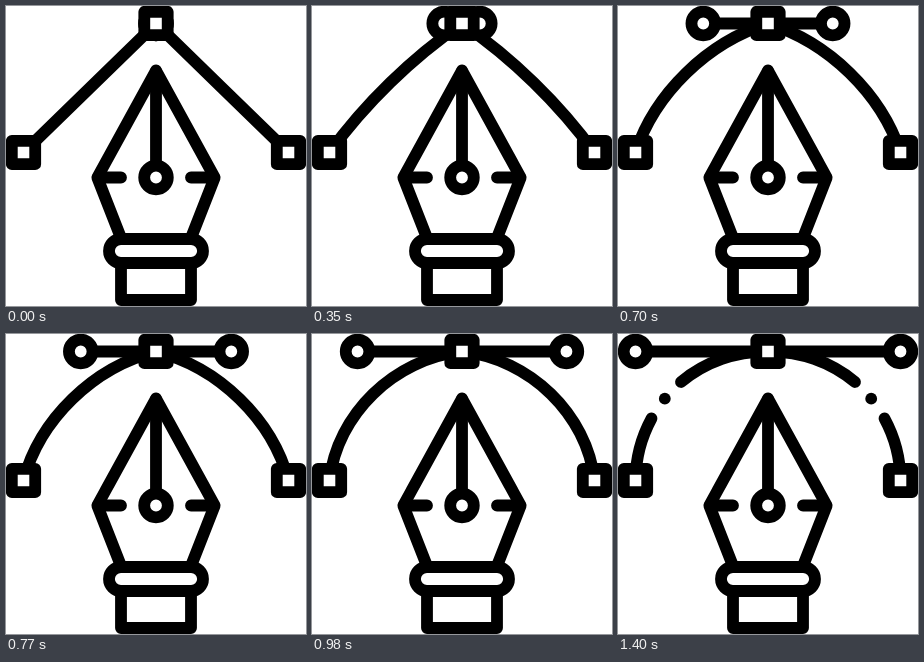
Recreate the animation shown at these times as an HTML page. Size 300 px wide and 300 px high, loop 2.4 s.

```html
<!DOCTYPE html>
<html lang="en">
<head>
<meta charset="utf-8">
<title>Pen tool</title>
<style>
  html, body { margin: 0; width: 100%; height: 100%; overflow: hidden; background: #fff; }
  svg { display: block; width: 100%; height: 100%; }
</style>
</head>
<body>
<svg viewBox="0 0 300 300" fill="none" stroke="#000" stroke-width="11.8" stroke-linecap="round" stroke-linejoin="round">
  <defs>
    <rect id="anchor" x="-11.7" y="-11.7" width="23.4" height="23.4" fill="#fff"/>
    <circle id="knob" r="11.8" fill="#fff"/>
    <g id="dashes">
      <path d="M17.5 146.5A132.5 132.5 0 0 1 33.5 84.5"/>
      <path d="M46.8 64.7h.01"/>
      <path d="M63 48A132.5 132.5 0 0 1 150 17.5"/>
    </g>
  </defs>

  <path id="curve"/>
  <g id="dashed">
    <use href="#dashes"/>
    <use href="#dashes" transform="matrix(-1 0 0 1 300 0)"/>
  </g>
  <path id="bar"/>
  <use id="left" href="#knob"/>
  <use id="right" href="#knob"/>
  <use href="#anchor" x="150" y="17.5"/>
  <use href="#anchor" x="17.5" y="146.5"/>
  <use href="#anchor" x="282.5" y="146.5"/>

  <path d="M115 232L91.3 171.5L150 64.5L208.7 171.5L185 232"/>
  <path d="M150 65V160M92 171.5H115M208 171.5H185"/>
  <use href="#knob" x="150" y="171.5"/>
  <rect x="115" y="257" width="70" height="37"/>
  <rect x="103" y="233" width="94" height="24" rx="12" fill="#fff"/>
</svg>
<script>
  const LOOP = 2400, STEP = 70, END = 1400;
  const TOP = 17.5, BASE = 146.5, MID = 150, REACH = 132.5;
  const $ = id => document.getElementById(id);
  const lerp = (a, b, k) => a + (b - a) * k;
  const clamp = v => Math.min(1, Math.max(0, v));
  const ease = p => (1 - Math.cos(Math.PI * p)) / 2;

  // One half of the curve: a straight line at bend 0, a quarter round at bend 1.
  function half(side, bend) {
    const rise = BASE - TOP;
    const px = dx => (MID + side * dx).toFixed(2);
    const lowX = lerp(REACH * 2 / 3, REACH, bend);
    const lowY = BASE - rise * lerp(1 / 3, 0.552, bend);
    const topX = REACH * lerp(1 / 3, 0.552, bend);
    const topY = TOP + rise * lerp(1 / 3, 0, bend);
    return `M${px(REACH)} ${BASE}C${px(lowX)} ${lowY} ${px(topX)} ${topY} ${MID} ${TOP}`;
  }

  function draw(time) {
    const t = Math.min(END, Math.floor(time / STEP) * STEP);
    const k = ease(clamp((t - 20) / 1380));
    const bend = Math.pow(k, 0.8);
    const dx = REACH * k;
    const done = t >= END;

    $("curve").setAttribute("d", half(-1, bend) + half(1, bend));
    $("curve").style.display = done ? "none" : "";
    $("dashed").style.display = done ? "" : "none";
    $("bar").setAttribute("d", `M${MID - dx} ${TOP}H${MID + dx}`);
    $("left").setAttribute("transform", `translate(${MID - dx} ${TOP})`);
    $("right").setAttribute("transform", `translate(${MID + dx} ${TOP})`);
  }

  const start = performance.now();
  function tick() {
    draw((performance.now() - start) % LOOP);
    requestAnimationFrame(tick);
  }
  tick();
</script>
</body>
</html>
```
